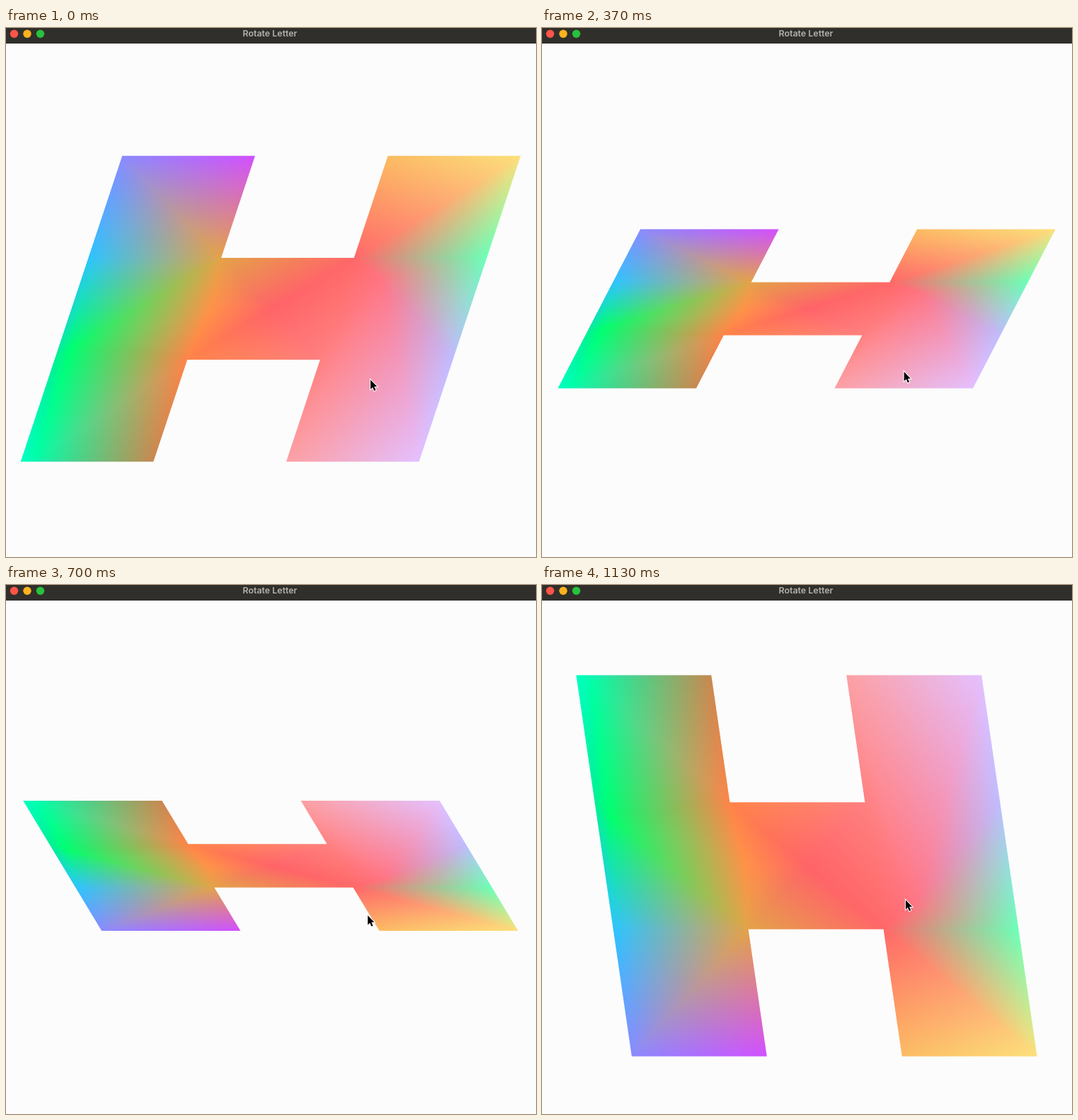
Write an HTML page with a canvas that moves like this. It is 749 by 748 pixels and loops after 1.16 s.

```html
<!DOCTYPE html>
<html>
<head>
<meta charset="utf-8">
<style>
  html, body { margin: 0; width: 100%; height: 100%; overflow: hidden; background: #fcfcfc; }
  canvas { display: block; }
</style>
</head>
<body>
<canvas id="stage" width="749" height="748"></canvas>
<script>
const ctx = document.getElementById('stage').getContext('2d');
const UNIT = 100, PAD = 8, SIZE = 3 * UNIT + 2 * PAD;

// Colour mesh of the letter on a 3 x 3 grid: x, y, colour
const points = {
  A: [0, 0, 0x8a8aff], B: [1, 0, 0xd24fff], C: [0, 1, 0x2cc4ff], D: [1, 1, 0xe4a248],
  E: [0, 2, 0x00f098], F: [1, 2, 0xff8448], G: [0, 3, 0x00ffc4], H: [1, 3, 0xc88850],
  I: [.1, 1.88, 0x00ff70], J: [.1, 2.95, 0x00ffa8], M: [1.05, 1.5, 0xff9248],
  N: [1.5, 1.5, 0xff6468], P: [2, 1, 0xff6868], Q: [2, 2, 0xff8080],
  R: [2, 0, 0xfcbc64], S: [3, 0, 0xfce07c], T: [3, 1, 0x6cffb8], U: [3, 2, 0xc0bcff],
  V: [2, 3, 0xfca0a4], W: [3, 3, 0xe4c0ff], X: [2.25, 1.2, 0xff7482]
};
const triangles = ('ABD ADC CDI CIE EIJ EJG IDM IMF IFJ JFH GJH DMN DNP FMN FNQ NPQ ' +
  'RSP PST PTX XTU XUW XWV XVQ PXQ').split(' ').map(t => [...t].map(k => points[k]));

function barycentric([a, b, c], x, y) {
  const det = (b[1] - c[1]) * (a[0] - c[0]) + (c[0] - b[0]) * (a[1] - c[1]);
  const p = ((b[1] - c[1]) * (x - c[0]) + (c[0] - b[0]) * (y - c[1])) / det;
  const q = ((c[1] - a[1]) * (x - c[0]) + (a[0] - c[0]) * (y - c[1])) / det;
  return [p, q, 1 - p - q];
}

function makeTexture() {
  const canvas = document.createElement('canvas');
  canvas.width = canvas.height = SIZE;
  const g = canvas.getContext('2d'), image = g.createImageData(SIZE, SIZE);
  for (let j = 0; j < SIZE; j++) for (let i = 0; i < SIZE; i++) {
    const x = (i + .5 - PAD) / UNIT, y = (j + .5 - PAD) / UNIT;
    let best = -Infinity, weights, tri;
    for (const t of triangles) {
      const w = barycentric(t, x, y), inside = Math.min(...w);
      if (inside > best) { best = inside; weights = w; tri = t; }
      if (inside >= 0) break;
    }
    const at = 4 * (j * SIZE + i);
    for (let ch = 0; ch < 3; ch++)
      image.data[at + ch] = weights.reduce((sum, w, n) => sum + w * (tri[n][2] >> (16 - 8 * ch) & 255), 0);
    image.data[at + 3] = 255;
  }
  g.putImageData(image, 0, 0);
  return ctx.createPattern(canvas, 'repeat');
}

const texture = makeTexture();
const letter = new Path2D();
for (const k of 'ABDPRSWVQFHG') letter.lineTo(...points[k].slice(0, 2).map(n => PAD + n * UNIT));
letter.closePath();
const arrow = new Path2D('M0 0V13.2L3 10.4L5.2 15.4L7.3 14.5L5.2 9.6H9.2Z');

// Step, tilt about x, turn about y (degrees)
const keys = [
  [0, 43.9, 20.2], [2, 35.6, 21], [7, 59.1, 13.1], [11, 68, 12.1], [14, 82, 12],
  [17, 98.4, 10.1], [19, 103, 11.2], [25, 117.6, 11.2], [31, 129.5, 12],
  [32, 140, 14], [34, 153.9, 17.3]
];

function pose(step) {
  const n = Math.max(1, keys.findIndex(k => k[0] >= step));
  const a = keys[n - 1], b = keys[n], f = (step - a[0]) / (b[0] - a[0]);
  return [1, 2].map(i => a[i] + (b[i] - a[i]) * f);
}

function drawBar() {
  ctx.fillStyle = '#302f2b';
  ctx.fillRect(0, 0, 749, 22);
  [[11.5, '#ff5449'], [30, '#ffb21e'], [48.5, '#28c23c']].forEach(([x, color]) => {
    ctx.fillStyle = color;
    ctx.beginPath();
    ctx.arc(x, 8.3, 5.7, 0, 7);
    ctx.fill();
  });
  ctx.fillStyle = '#b4b2ae';
  ctx.font = '600 12.4px Inter, sans-serif';
  ctx.textAlign = 'center';
  ctx.fillText('Rotate Letter', 373, 12.4);
}

function drawLetter(tilt, turn) {
  const [p, q] = [tilt, turn].map(d => d * Math.PI / 180), s = 2;
  ctx.setTransform(s * Math.cos(q), 0, -s * Math.sin(q) * Math.sin(p), s * Math.cos(p), 374, 397);
  ctx.translate(-SIZE / 2, -SIZE / 2);
  ctx.fillStyle = texture;
  ctx.fill(letter);
  ctx.resetTransform();
}

function drawCursor(x, y) {
  ctx.setTransform(1, 0, 0, 1, x, y);
  ctx.lineWidth = 2;
  ctx.strokeStyle = '#fff';
  ctx.stroke(arrow);
  ctx.fillStyle = '#000';
  ctx.fill(arrow);
  ctx.resetTransform();
}

function draw(now) {
  const step = Math.floor((Math.floor(now % 1160 / 10) + .5) * .3);
  const [tilt, turn] = pose(step);
  ctx.fillStyle = '#fcfcfc';
  ctx.fillRect(0, 0, 749, 748);
  drawBar();
  drawLetter(tilt, turn);
  drawCursor(510.8 + (turn - 10.1) / 2.3, 497.5 - (tilt - 43.9) / 2.115);
}

const start = performance.now();
function loop() {
  draw(performance.now() - start);
  requestAnimationFrame(loop);
}
loop();
</script>
</body>
</html>
```
